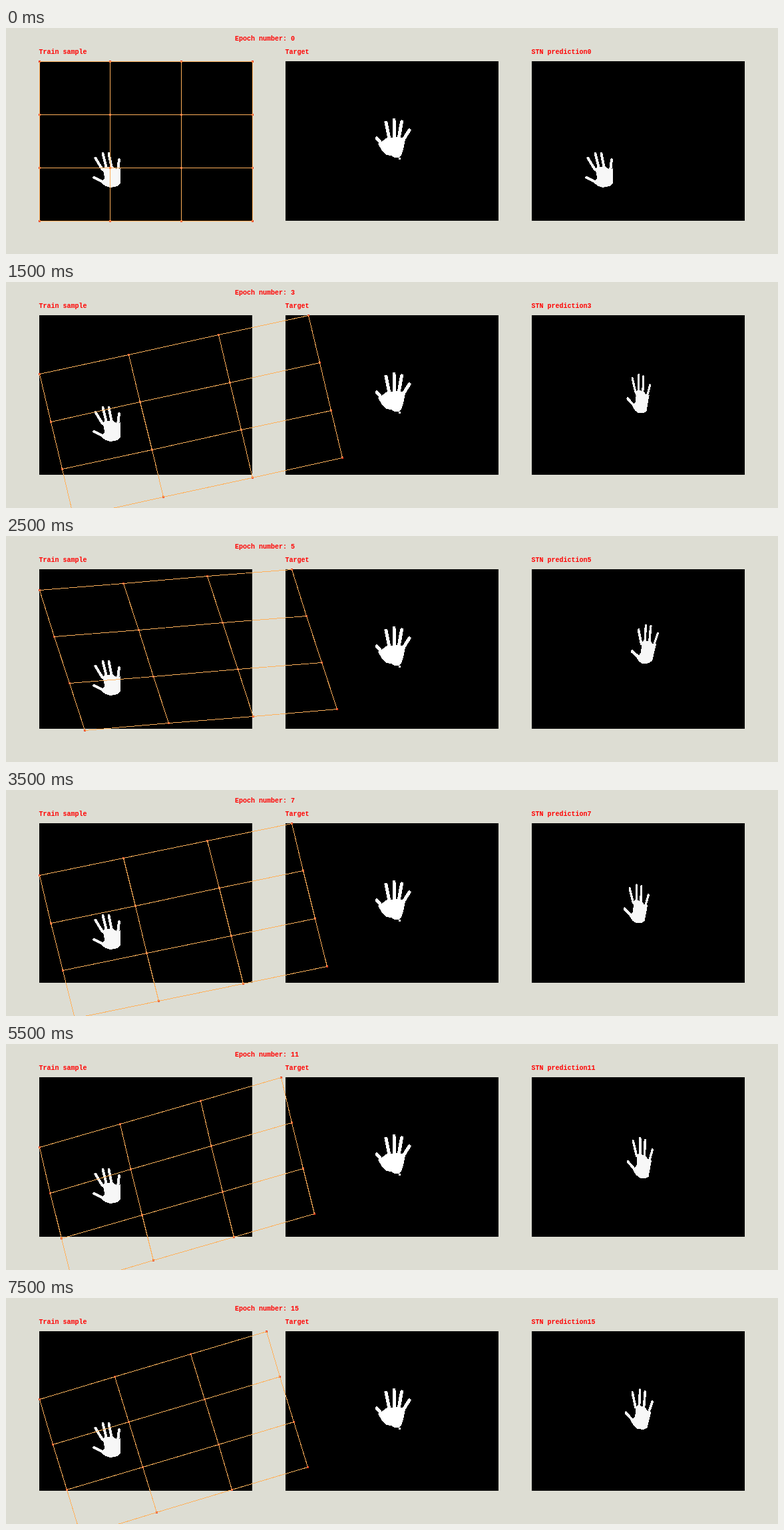
Animation, 1160 px wide and 340 px high, one loop 8000 ms. Source, as an HTML page:

```html
<!DOCTYPE html>
<html lang="en">
<head>
<meta charset="utf-8">
<title>STN training</title>
<style>
  html, body { margin: 0; width: 100%; height: 100%; overflow: hidden; background: #ddddd3; }
  svg { display: block; width: 1160px; height: 340px; shape-rendering: crispEdges; }
  text { font: bold 10px "Liberation Mono", monospace; fill: #f00; white-space: pre; }
  .hand { fill: #f7f7f7; stroke: #f7f7f7; stroke-linecap: round; }
  .hand .palm { stroke: none; }
  #goal { fill: #fff; stroke: #fff; }
  #mesh { fill: none; stroke: #ffb05a; }
  #nodes { fill: #e8321c; }
</style>
</head>
<body>
<svg viewBox="0 0 1160 340">
  <path d="M50 50h320v240h-320zM420 50h320v240h-320zM790 50h320v240h-320z"/>
  <g id="sample" class="hand" stroke-width="4"></g>
  <g id="goal" class="hand" stroke-width="5"></g>
  <path d="M590 195h3v3h-3z" fill="#fff"/>
  <use id="prediction" href="#sample"/>
  <path id="nodes"/>
  <path id="mesh"/>
  <text x="344" y="19" id="epoch"></text>
  <text x="49.5" y="39">Train sample</text>
  <text x="419.5" y="39">Target</text>
  <text x="789.5" y="39" id="label"></text>
</svg>
<script>
const STEP = 500, EPOCHS = 16;
const LEFT = 50, TOP = 50, WIDTH = 320, HEIGHT = 240;
const SAMPLE_CENTER = '-151 -213';

// Mesh and hand poses at a few epochs; the epochs between are blended.
const KEYS = [
  { at: 0, leftY: 50, topX: 370.5, side: [0, 240.5], hand: [891, 213] },
  { at: 1, leftY: 97, topX: 444, side: [40, 220], hand: [949, 169] },
  { at: 3, leftY: 138.5, topX: 454, side: [51.5, 214.5], hand: [950.5, 167] },
  { at: 5, leftY: 81.5, topX: 429, side: [68.5, 210.5], hand: [959.5, 162] },
  { at: 7, leftY: 128.5, topX: 429, side: [53.5, 215], hand: [947, 170] },
  { at: 9, leftY: 152.5, topX: 417, side: [61.5, 219], hand: [947.5, 169] },
  { at: 11, leftY: 155.5, topX: 413, side: [50.5, 205.5], hand: [952.5, 170] },
  { at: 15, leftY: 152.5, topX: 391, side: [62.5, 204.5], hand: [951, 166] }
];

const $ = id => document.getElementById(id);

// A hand is a palm outline plus one round-ended stroke per finger.
function buildHand(id, palm, fingers) {
  $(id).innerHTML = `<path class="palm" d="M${palm}z"/><path d="${fingers}"/>`;
}

function poseAt(epoch) {
  const next = Math.max(1, KEYS.findIndex(k => k.at >= epoch));
  const from = KEYS[next - 1], to = KEYS[next];
  const u = (epoch - from.at) / (to.at - from.at);
  const mix = (a, b) => a + (b - a) * u;
  return {
    leftY: mix(from.leftY, to.leftY),
    topX: mix(from.topX, to.topX),
    side: from.side.map((v, i) => mix(v, to.side[i])),
    hand: from.hand.map((v, i) => mix(v, to.hand[i]))
  };
}

function drawMesh({ leftY, topX, side }) {
  const at = (i, j) => [
    Math.floor(LEFT + (topX - LEFT) * i / 3 + side[0] * j / 3),
    Math.floor(leftY + (TOP - leftY) * i / 3 + side[1] * j / 3)
  ];
  const steps = [0, 1, 2, 3];
  const polyline = pts => 'M' + pts.map(([x, y]) => `${x + .5} ${y + .5}`).join('L');
  const dot = ([x, y]) => `M${x - 1} ${y - 1}h3v3h-3z`;
  $('mesh').setAttribute('d', steps.map(i =>
    polyline(steps.map(j => at(i, j))) + polyline(steps.map(j => at(j, i)))).join(''));
  $('nodes').setAttribute('d', steps.flatMap(i => steps.map(j => dot(at(i, j)))).join(''));
}

// The prediction is the sample seen through the inverse of the mesh's linear map.
function drawPrediction({ leftY, topX, side, hand }) {
  const inverse = new DOMMatrix([
    (topX - LEFT) / WIDTH, (TOP - leftY) / WIDTH, side[0] / HEIGHT, side[1] / HEIGHT, 0, 0
  ]).inverse();
  $('prediction').setAttribute('transform',
    `translate(${hand}) ${inverse} translate(${SAMPLE_CENTER})`);
}

let shown = -1;
const start = performance.now();
function render() {
  const epoch = Math.floor((performance.now() - start) / STEP) % EPOCHS;
  if (epoch !== shown) {
    shown = epoch;
    const pose = poseAt(epoch);
    drawMesh(pose);
    drawPrediction(pose);
    $('epoch').textContent = 'Epoch number: ' + epoch;
    $('label').textContent = 'STN prediction' + epoch;
  }
  requestAnimationFrame(render);
}

buildHand('sample',
  '145 213L148 209L161 209L167 213L172 211L172 234L167 238L157 240L150 238L143 233L148 226L147 218',
  'M132 225L147 232M134.5 196L145 213M145.5 189L151 211M154.5 189L159 211M170 198L168 215');
buildHand('goal',
  '564 171L574 164L580 165L588 164L595 165L600 168L597 183L594 192L590 195L584 195L579 192L571 191L565 185L559 174',
  'M557 166L567 177M571 142L576 167M583 138L583.5 167M594.5 141L590 167M606 154L597 168');
render();
</script>
</body>
</html>
```
